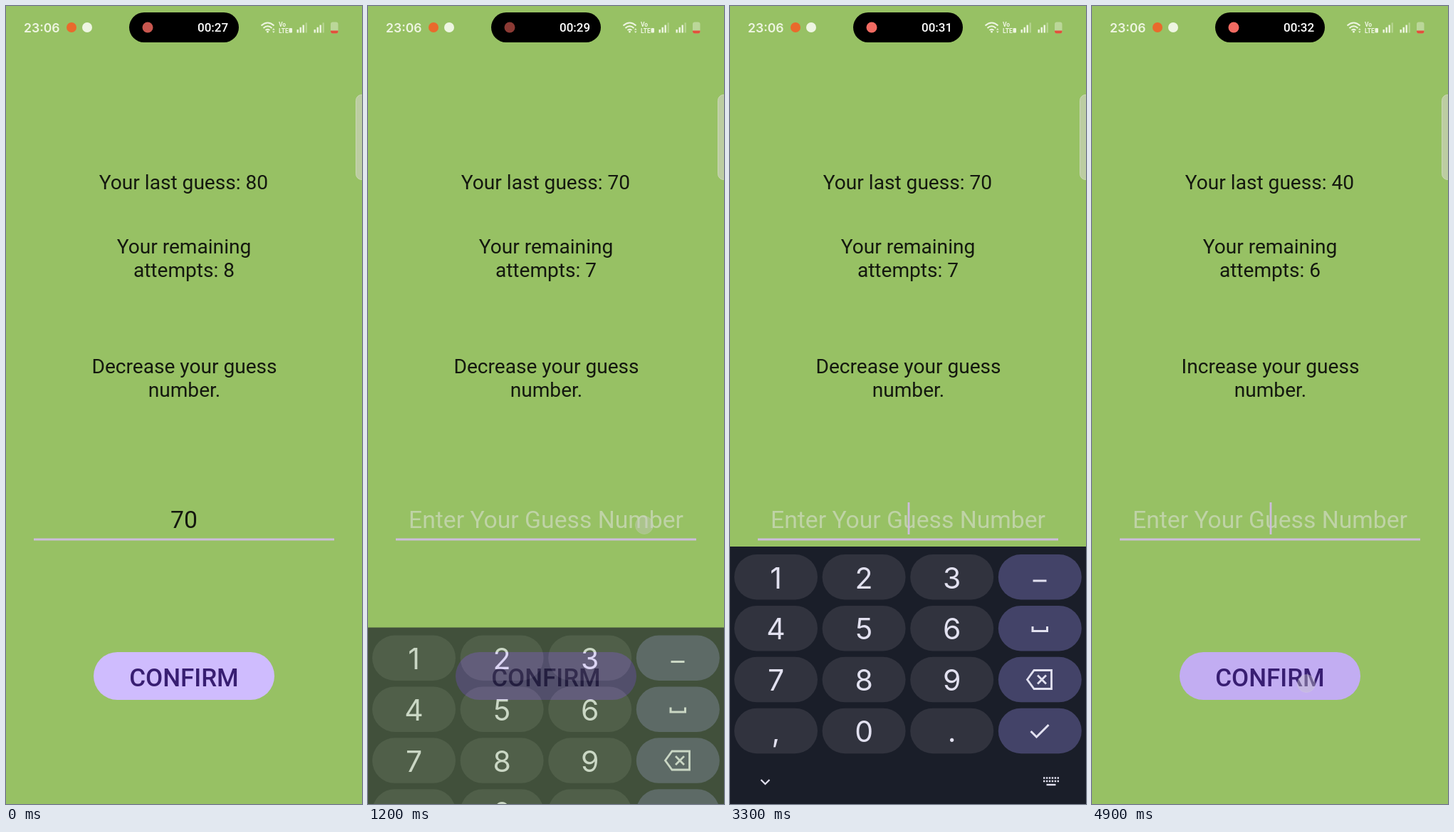
Write an HTML page that moves like this. It is 500 px wide and 1119 px high and loops after 5 s.

```html
<!DOCTYPE html>
<html lang="en">
<head>
<meta charset="utf-8">
<title>Guess the number</title>
<style>
html, body { margin: 0; width: 100%; height: 100%; overflow: hidden; background: #97c164; }
svg { display: block; width: 500px; height: 1119px; }
text { font-family: Roboto, sans-serif; }
.label { font-size: 28.1px; fill: #14180f; text-anchor: middle; }
.field { font-size: 33.7px; text-anchor: middle; }
.digit { font: 400 41px Inter, sans-serif; fill: #e2e1f0; text-anchor: middle; }
.line { fill: none; stroke: #e2e1f0; stroke-width: 3; }
</style>
</head>
<body>
<svg viewBox="0 0 500 1119">
  <rect width="500" height="1119" fill="#97c164"/>

  <g fill="#eef5e2">
    <text x="25" y="36.5" style="font:600 17.6px Inter,sans-serif">23:06</text>
    <circle cx="92" cy="30" r="7" fill="#e96a2c"/>
    <circle cx="114" cy="30" r="7"/>
    <g fill="none" stroke="#eef5e2" stroke-width="2">
      <path d="M358.500 27.500Q367.500 19.500 376.500 27.500M361.500 31Q367.500 25.500 373.500 31M364.500 34Q367.500 31.500 370.500 34"/>
    </g>
    <circle cx="367.500" cy="36" r="1.500"/>
    <path d="M374 33.500l1.800-2.200 1.800 2.200zM374 35.500l1.800 2.200 1.800-2.200z"/>
    <text x="383" y="29" style="font:700 8.500px Roboto,sans-serif">Vo</text>
    <text x="383" y="37.500" style="font:700 8.500px Roboto,sans-serif">LTE</text>
    <rect x="397.500" y="31" width="4.500" height="6.500" rx="1"/>
    <g id="signals"></g>
    <rect x="456" y="22.500" width="10.500" height="16" rx="3" opacity=".42"/>
    <path d="M456 34.500h10.500v1a3 3 0 0 1-3 3h-4.500a3 3 0 0 1-3-3z" fill="#e2503c"/>
  </g>

  <rect x="173" y="9" width="154" height="42" rx="21"/>
  <circle id="rec" cx="199" cy="30" r="7.500"/>
  <text id="timer" x="269" y="36" font-size="17" font-weight="500" fill="#fff"></text>

  <rect x="491.500" y="124.500" width="20" height="119" rx="8" fill="#bccda2" stroke="#cbd8b6"/>

  <text id="last" class="label" x="249.500" y="257"></text>
  <text class="label" x="250" y="347">Your remaining</text>
  <text id="left" class="label" x="250" y="380"></text>
  <text id="advice" class="label" x="250.500" y="515"></text>
  <text class="label" x="250.500" y="548">number.</text>

  <text id="hint" class="field" x="250" y="732" fill="#bfd3a6">Enter Your Guess Number</text>
  <text id="value" class="field" x="250" y="732" fill="#14180f"></text>
  <rect x="39" y="746.500" width="422" height="3" fill="#cdbcdc"/>
  <rect id="cursor" y="696" width="2.800" height="45" fill="#cdbcdc"/>

  <rect id="button" x="123" y="906" width="254" height="67" rx="33.500"/>
  <text x="250" y="953.500" font-size="35" font-weight="500" fill="#381e72" text-anchor="middle">CONFIRM</text>

  <g id="keyboard">
    <rect y="758" width="500" height="361" fill="#1a1e29"/>
    <g id="keys"></g>
    <g class="line">
      <path d="M425.500 806h19"/>
      <path d="M425 870v6.500h20.500v-6.500"/>
      <path d="M417.500 944.500l9.500-13h24.500v26h-24.500zM432 938.500l12 12M444 938.500l-12 12" stroke-width="2.800"/>
      <path d="M422.500 1017l8 8 17-17"/>
      <path d="M43.500 1085l6 6 6-6" stroke-width="2.200"/>
      <path d="M440 1082.500h22M440 1087h22" stroke-width="2.400" stroke-dasharray="2.400 1.520"/>
      <path d="M444.500 1092h13" stroke-width="2.400"/>
    </g>
  </g>

  <g id="touch">
    <circle r="12.500" fill="#c8c8c8" fill-opacity=".75" stroke="#e0e0e0" stroke-opacity=".4"/>
  </g>
</svg>

<script>
const LOOP = 5000;
const $ = id => document.getElementById(id);
const clamp = v => Math.min(1, Math.max(0, v));
const set = (id, attrs) => {
  for (const name in attrs) $(id).setAttribute(name, attrs[name]);
};
const write = (id, text) => {
  if ($(id).textContent !== text) $(id).textContent = text;
};

// Each row is [start, ...values]; the latest started row wins.
const at = (steps, t) => steps.filter(s => s[0] <= t).pop();

const rounds = [
  [0, 80, 8, "Decrease"],
  [300, 70, 7, "Decrease"],
  [4840, 40, 6, "Increase"]
];
const typed = [[0, "70"], [300, ""], [3560, "4"], [3960, "40"], [4840, ""]];
const blink = [[300, 800], [1320, 1850], [2330, 2800], [3280, 4450], [4840, 5000]];

// Touches: press, release, x, y
const taps = [
  [70, 280, 301, 950],
  [1030, 1140, 388, 728],
  [3460, 3560, 66, 885],
  [3880, 4010, 196, 1037],
  [4170, 4280, 436, 1026],
  [4710, 4840, 301, 950]
];
const FADE = 130;

// Recording light: time, brightness
const glow = [
  [0, .6], [80, 0], [200, 0], [360, .55], [600, .75], [900, .8], [1080, 0],
  [1200, 0], [1350, .9], [1900, 1], [2080, 0], [2190, 0], [2330, 1],
  [2880, 1], [3030, 0], [3150, 0], [3290, 1], [3820, 1], [3970, 0],
  [4110, 0], [4260, 1], [5000, 1]
];
const dim = [138, 58, 52], bright = [242, 107, 98];

function lerpAt(points, t) {
  const i = points.findIndex(p => p[0] > t);
  const [t0, a] = points[i - 1], [t1, b] = points[i];
  return a + (b - a) * (t - t0) / (t1 - t0);
}

function buildKeys() {
  const labels = ["123", "456", "789", ",0."];
  let out = "";
  labels.forEach((row, r) => {
    for (let c = 0; c < 4; c++) {
      const x = 6 + c * 123.6, y = 769 + r * 71.9;
      out += `<rect x="${x}" y="${y}" width="117" height="63.500" rx="31.750" fill="${c < 3 ? "#31333e" : "#434368"}"/>`;
      if (c < 3) out += `<text class="digit" x="${x + 58.5}" y="${y + 47.5}">${row[c]}</text>`;
    }
  });
  $("keys").innerHTML = out;
}

function buildSignals() {
  let out = "";
  for (const x of [408.5, 432.5])
    for (let i = 0; i < 4; i++) {
      const h = 4.5 + i * 3.2;
      out += `<rect x="${x + i * 4}" y="${37.5 - h}" width="2.400" height="${h}" opacity="${i < 3 ? 1 : .35}"/>`;
    }
  $("signals").innerHTML = out;
}

function render(t) {
  const [, guess, left, verb] = at(rounds, t);
  write("last", `Your last guess: ${guess}`);
  write("left", `attempts: ${left}`);
  write("advice", `${verb} your guess`);
  write("timer", "00:" + (27 + Math.floor((t + 850) / 1000)));

  const value = at(typed, t)[1];
  write("value", value);
  set("hint", { opacity: value ? 0 : 1 });
  set("cursor", {
    x: 249.6 + value.length * 9.5,
    opacity: blink.some(([a, b]) => t >= a && t < b) ? 1 : 0
  });

  const g = lerpAt(glow, t);
  set("rec", { fill: `rgb(${dim.map((d, i) => Math.round(d + (bright[i] - d) * g))})` });

  const shown = 1 - (1 - clamp((t - 1078) / 280)) ** 2;
  const hidden = clamp((t - 4320) / 220) ** 2;
  const k = shown * (1 - hidden);
  set("keyboard", { transform: `translate(0 ${361 * (1 - k)})`, opacity: k });

  const tap = taps.find(([a, b]) => t >= a && t < b + FADE);
  const force = tap ? 1 - clamp((t - tap[1]) / FADE) : 0;
  set("touch", { opacity: force });
  if (tap) set("touch", { transform: `translate(${tap[2]} ${tap[3]})` });
  const pressed = tap && tap[3] === 950;
  set("button", { fill: pressed ? "#c2adf2" : "#cfbcfe" });
}

buildKeys();
buildSignals();
const start = performance.now();
function frame() {
  render((performance.now() - start) % LOOP);
  requestAnimationFrame(frame);
}
frame();
</script>
</body>
</html>
```
